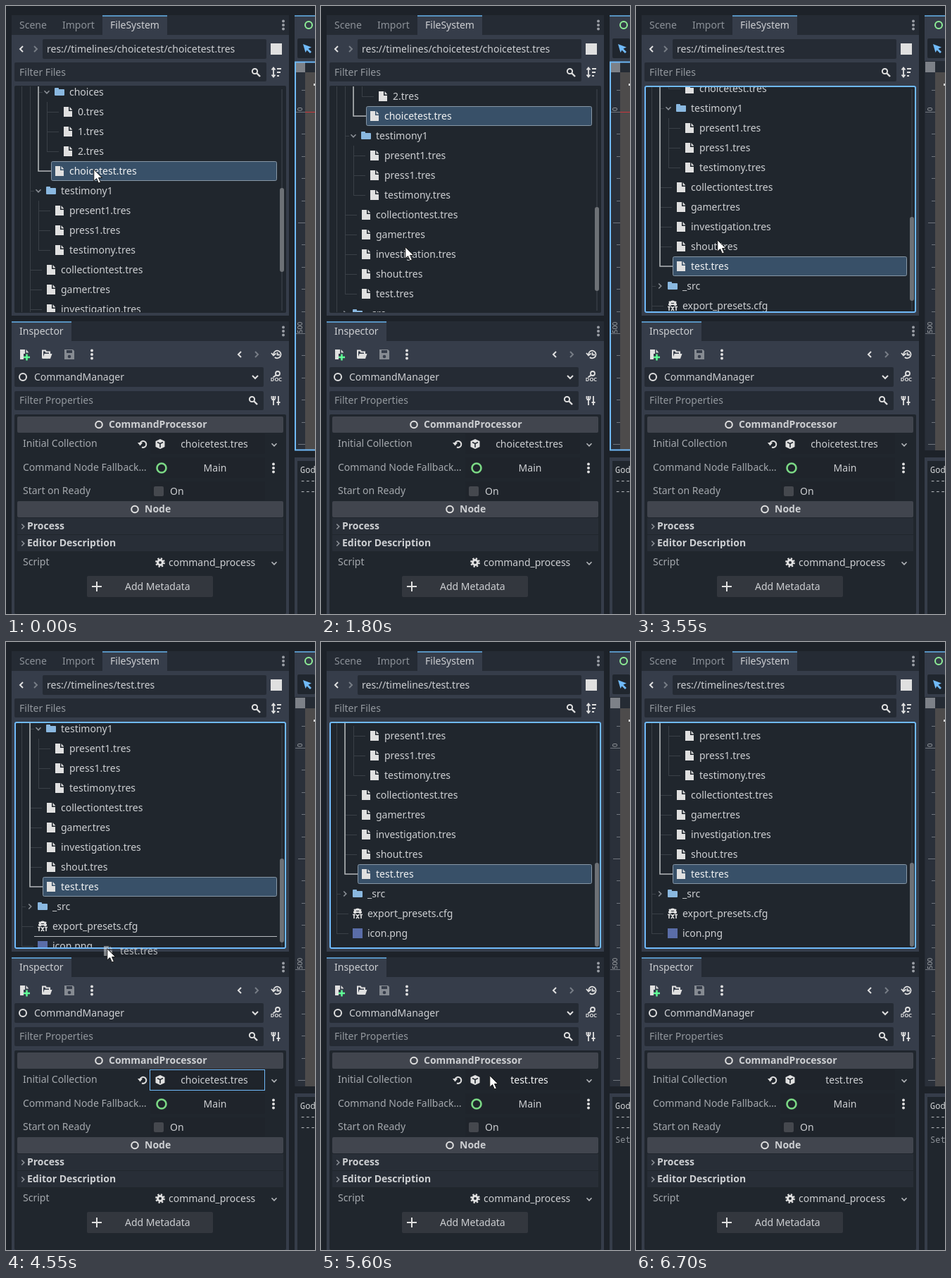
Recreate the animation shown at these times as an HTML page. Size 439 by 862 pixels, loop 7 s.

```html
<!DOCTYPE html>
<html lang="en">
<head>
<meta charset="utf-8">
<title>Editor docks</title>
<style>
  html, body { margin: 0; width: 100%; height: 100%; overflow: hidden; background: #1d2229; }
  svg { display: block; width: 439px; height: 862px; }
  text { font: 14px "Noto Sans", sans-serif; white-space: pre; }
  .b { font-weight: 700; }
  .m { font: 12px "Noto Sans Mono", monospace; }
  .s { font-size: 9.5px; }
</style>
</head>
<body>
<svg id="stage" viewBox="0 0 439 862"></svg>
<script>
const BASE = '#363d4a', DARK = '#1d2229', FIELD = '#252b34', LIST = '#20262d';
const TEXT = '#cdcfd2', DIM = '#8c9198', ICON = '#e0e0e0', BLUE = '#70bafa', LINE = '#5792c0';
const GREEN = '#8eef97', FOLDER = '#8ab8e0', GUIDE = '#3a4047', PATH = '#b0b3b6';

// Drawing helpers; text is placed by the middle of its line.
const rect = (x, y, w, h, fill, more = '') =>
  `<rect x="${x}" y="${y}" width="${w}" height="${h}" fill="${fill}" ${more}/>`;
const text = (x, y, str, fill = TEXT, more = '') =>
  `<text x="${x}" y="${y + 5}" fill="${fill}" ${more}>${str}</text>`;
const line = (d, stroke = ICON, w = 2, more = '') =>
  `<path d="${d}" fill="none" stroke="${stroke}" stroke-width="${w}" ${more}/>`;
const shape = (d, fill = ICON, more = '') => `<path d="${d}" fill="${fill}" ${more}/>`;
const ring = (x, y, r = 5, stroke = ICON, w = 2) =>
  `<circle cx="${x}" cy="${y}" r="${r}" fill="none" stroke="${stroke}" stroke-width="${w}"/>`;
const at = (x, y, body, more = '') => `<g transform="translate(${x} ${y})" ${more}>${body}</g>`;
const group = (id, body) => `<g id="${id}">${body}</g>`;
const mid = 'text-anchor="middle"';

const dots = (x, y, fill = ICON) =>
  [-5.5, 0, 5.5].map(d => `<circle cx="${x}" cy="${y + d}" r="2" fill="${fill}"/>`).join('');
const down = (x, y, s = 4, c = ICON, w = 2) =>
  line(`M${x - s} ${y - s / 2}l${s} ${s} ${s} ${-s}`, c, w);
const side = (x, y, dir, c = ICON, s = 4, w = 2) =>
  line(`M${x - dir * s / 2} ${y - s}l${dir * s} ${s} ${-dir * s} ${s}`, c, w);
const lens = (x, y) => ring(x - 1.5, y - 1.5, 3.6) + line(`M${x + 1} ${y + 1}l5 5`, ICON, 2.4);

const file = (x, y, more) =>
  at(x, y, shape('M-6 -7H1V-1H6V7H-6ZM2.5 -7L6 -3V-2.5H2.5Z'), more);
const folder = (x, y) => at(x, y, shape('M-7 -5q0 -1 1 -1h4q1 0 1 1v1h7q1 0 1 1v7q0 1 -1 1h-12q-1 0 -1 -1Z', FOLDER));
const gear = (x, y, r = 5.2) =>
  `<circle cx="${x}" cy="${y}" r="${r}" fill="none" stroke="${ICON}" stroke-width="3.4" stroke-dasharray="2.05 2.05"/>` +
  ring(x, y, 3.4, ICON, 3);
const cube = (x, y) => at(x, y,
  shape('M0 -7L6.5 -4V4L0 7L-6.5 4V-4Z') + line('M-4 -2.5L0 -.6L4 -2.5M0 0V4.8', LIST, 1.6));
const textFile = (x, y) => at(x, y,
  ring(0, -2, 4, ICON, 3) + line('M-6 -2H6M0 -7V-4M-5 -6l2 2M5 -6l-2 2', ICON, 2) +
  rect(-8, 0, 16, 8, LIST) + line('M-7 1.5h4M-5 1.5V7M-2 1l4 6M2 1l-4 6M3 1.5h4M5 1.5V7', ICON, 1.6));
const thumb = (x, y) => rect(x - 7, y - 7, 14, 14, '#5a6da8');

// Tree rows: name, depth, kind (f file, d open folder, c closed folder, x config, p picture).
const rows = [
  ['choices', 2, 'd'], ['0.tres', 3, 'f'], ['1.tres', 3, 'f'], ['2.tres', 3, 'f'],
  ['choicetest.tres', 2, 'f'], ['testimony1', 1, 'd'], ['present1.tres', 2, 'f'],
  ['press1.tres', 2, 'f'], ['testimony.tres', 2, 'f'], ['collectiontest.tres', 1, 'f'],
  ['gamer.tres', 1, 'f'], ['investigation.tres', 1, 'f'], ['shout.tres', 1, 'f'],
  ['test.tres', 1, 'f'], ['_src', 0, 'c'], ['export_presets.cfg', 0, 'x'], ['icon.png', 0, 'p']
];

function treeRow([name, depth, kind], i) {
  const y = 122 + 28 * i, x = 66 + 12 * depth, isDir = kind === 'd' || kind === 'c';
  let out = line(`M${x - 44} ${y + .5}h${isDir ? 6 : 17}`, GUIDE, 1);
  if (kind === 'd') out += down(x - 32, y, 3.5, DIM, 1.6);
  if (kind === 'c') out += side(x - 32, y, 1, DIM, 3.5, 1.6);
  const icon = { d: folder, c: folder, f: file, x: textFile, p: thumb }[kind];
  return out + icon(x - 14, y) + text(x, y, name);
}

function selection(id, x, y, name, depth) {
  const gx = 22 + 12 * depth;
  return group(id,
    line(`M${gx} 80V${y}H${x}`, PATH, 1.6) +
    rect(x + .5, y - 13.5, 384 - x, 27, '#385068', 'stroke="#8797a6" rx="2"') +
    file(x + 12, y) + text(x + 26, y, name, '#f0f1f2'));
}

const tree = () =>
  line('M22.5 60V570M34.5 60V486M46.5 60V234M46.5 276V346M58.5 136V206', GUIDE, 1) +
  rows.map(treeRow).join('') +
  selection('selOld', 64, 234, 'choicetest.tres', 2) +
  selection('selNew', 52, 486, 'test.tres', 1) +
  group('dropLine', rect(40, 556, 345, 1, '#b9bcc0'));

const fileDock = () =>
  rect(8, 13, 394, 28, FIELD) + rect(8, 41, 394, 398, BASE) +
  rect(137, 13, 92, 28, BASE) + rect(137, 13, 92, 2, LINE) +
  text(19, 27, 'Scene', DIM) + text(80, 27, 'Import', DIM) + text(148, 27, 'FileSystem') +
  dots(394, 27, '#9a9ea5') +
  side(22, 61, -1) + side(42, 61, 1, '#777d86') +
  rect(52, 47, 318, 28, FIELD, 'rx="2"') +
  `<text id="path" x="58" y="66" fill="${TEXT}"></text>` +
  rect(376, 53, 16, 16, ICON) +
  rect(12, 80, 358, 27, FIELD, 'rx="2"') + text(19, 94, 'Filter Files', '#93989e') + lens(355, 94) +
  line('M380 88V100M377.5 90.5L380 87.5L382.500 90.5M377.5 97.500L380 100.5L382.5 97.5M385 89h6M385 94h5M385 99h3', ICON, 1.8) +
  rect(12, 113, 386, 322, LIST, 'rx="2"') +
  `<clipPath id="view"><path d="M12 114H398V434H12Z"/></clipPath>` +
  `<g clip-path="url(#view)">${group('tree', tree())}</g>` +
  rect(391, 118, 2, 314, '#30363e') +
  rect(389, 258, 6, 119, '#6d7176', 'id="bar" rx="3"') +
  rect(13, 114, 384, 320, 'none', `id="listFocus" stroke="${BLUE}" stroke-width="2" rx="2"`);

const category = (y, x, name) =>
  rect(16, y, 378, 23, '#41454e', 'rx="2"') + ring(x, y + 11.5, 4.8) + text(x + 14, y + 11, name, TEXT, 'class="b"');
const section = (id, y, name) =>
  rect(16, y - 11, 378, 23, '#282e37', `id="${id}"`) +
  side(24, y + 1, 1, DIM, 3.5, 1.6) + text(30, y, name, TEXT, 'class="b"');
const label = (y, name) => text(24, y, name, '#a5a9ae');
const slot = (y, h = 29) => rect(205, y, 163, h, '#1f242b', 'rx="2"');

const inspector = () =>
  rect(8, 447, 394, 28, FIELD) + rect(8, 475, 394, 387, BASE) +
  rect(8, 447, 85, 28, BASE) + rect(8, 447, 85, 2, LINE) +
  text(19, 461, 'Inspector') + dots(394, 461, '#9a9ea5') +
  file(26, 494) + rect(25, 493, 10, 10, BASE) + line('M29.500 493.5v9M25 498h9', '#5fff97', 2.4) +
  at(58, 494, line('M-6 5.5V-5.5H-2L-1 -3.5H4V-1', ICON, 2) + shape('M-6 6L-3.500 -1H7.5L5 6Z')) +
  at(90, 494, shape('M-7 -7H5L7 -5V7H-7ZM-4 -6V-2H4V-6Z', '#868b92', 'fill-rule="evenodd"') +
    `<circle cy="3" r="2.300" fill="${BASE}"/>`) +
  dots(122, 494) + side(332, 494, -1) + side(356, 494, 1, '#777d86') +
  line('M380 494a5.3 5.3 0 1 1 1.800 4M377 492l3 3.500 3.500 -3M385.5 491v3.5h3.5', ICON, 1.8) +
  rect(12, 512, 354, 28, FIELD, 'rx="2"') + ring(24, 526, 5) + text(40, 526, 'CommandManager') + down(354, 526, 4) +
  ring(386, 521, 3, ICON, 1.8) + line('M383.500 523.500l-4 3', ICON, 2) +
  text(384, 527, 'DOC', ICON, `class="b" style="font-size:7.5px" ${mid}`) +
  rect(12, 546, 354, 27, FIELD, 'rx="2"') + text(19, 559, 'Filter Properties', '#93989e') + lens(351, 559) +
  line('M380 553V557M380 559V566M387 553V561M387 563V566', ICON, 1.8) +
  line('M377.500 558h5M384.5 562h5M377.5 553v4M382.5 553v4', ICON, 1.8) +
  rect(12, 579, 386, 283, LIST, 'rx="2"') +
  category(582, 132, 'CommandProcessor') +
  label(620, 'Initial Collection') +
  line('M190.500 620a4.5 4.5 0 1 1 2.500 5.500', ICON, 2) + shape('M187 619h7l-3.5 4.500Z') +
  slot(606) + cube(219, 621) +
  `<text id="value" x="296" y="626" ${mid}></text>` +
  rect(204.5, 606.5, 163, 29, 'none', `id="dropFocus" stroke="${BLUE}"`) +
  down(381, 622, 3.5, '#b4b7bb', 1.6) +
  label(654, 'Command Node Fallback…') + slot(640) + ring(221, 655, 6.5, '#7bd985', 2.6) +
  text(297, 655, 'Main', TEXT, mid) + dots(380, 655) +
  label(687, 'Start on Ready') + slot(674, 27) + rect(210, 681, 14, 14, '#45484e', 'rx="2"') + text(233, 688, 'On') +
  category(702, 183, 'Node') +
  section('process', 737, 'Process') + section('desc', 761, 'Editor Description') +
  label(788, 'Script') + gear(219, 789) + text(231, 789, 'command_process') + down(381, 790, 3.5, '#b4b7bb', 1.6) +
  rect(115, 808, 179, 30, '#33373e', 'rx="2"') + line('M122 823h14M129 816v14') + text(169, 823, 'Add Metadata');

function ruler() {
  let d = '';
  for (let k = -1; k <= 15; k++) {
    const y = 150 + 31.4 * k;
    d += `M${k % 10 === 0 ? 411 : k % 5 === 0 ? 415 : 420} ${Math.round(y) + .5}H425`;
  }
  const mark = (y, s) => `<text class="s" transform="translate(421 ${y}) rotate(-90)" fill="#a5a8ac">${s}</text>`;
  return rect(411, 79, 14, 551, '#2a303a') + line(d, '#70757d', 1) +
    rect(411, 79, 14, 15, '#7d8188') + mark(149, '0') + mark(464, '500');
}

const mono = (y, s, c = '#b9bcc0') => text(418, y - 1, s, c, 'class="m"');
const viewport = () =>
  rect(410, 13, 29, 617, BASE) + rect(410, 13, 29, 2, LINE) + ring(430, 27, 5, GREEN) +
  rect(414, 46, 25, 28, '#20262e', 'rx="2"') + shape('M422 54L434 58.500L429.500 60.5L434 65L432 67L427.500 62.500L425.500 66Z', '#70bafa') +
  rect(410, 78, 29, 552, '#252b34') + rect(425, 94, 14, 536, '#4d4b4b') + ruler() +
  rect(437, 110, 2, 3, '#d8d8d8') +
  group('viewFocus', rect(425, 150, 14, 1, '#c9353d') + line('M440 79.5H411V629.5H440', BLUE, 2)) +
  rect(410, 640, 29, 222, BASE) + rect(414, 645, 25, 217, LIST) +
  mono(658, 'Godo', '#d2d4d6') + mono(673, '----') + mono(688, '----') + group('log', mono(706, 'Set ', '#8f9399'));

const tooltip = (id, x, y, w, lines) => group(id,
  rect(x, y, w, 5 + 23 * lines.length, '#12151a', 'fill-opacity=".92" rx="2"') +
  lines.map((s, i) => text(x + 6, y + 14 + 23 * i, s)).join(''));

const pointer = () => group('pointer',
  group('drag', file(2, 4, 'opacity=".5"') + text(19, 4, 'test.tres', '#b5b8bb')) +
  shape('M.8 .8V17L4.600 13.500L7.500 20L10.300 18.800L7.500 12.500H12.500Z', '#fff', 'stroke="#1a1a1a"'));

document.getElementById('stage').innerHTML =
  rect(0, 0, 439, 862, DARK) + viewport() + fileDock() + inspector() +
  tooltip('tipFile', 134, 241, 112, ['choicetest.tres', 'Size: 462 B', 'Type: Resource']) +
  tooltip('tipValue', 249, 624, 185, ['res://timelines/test.tres', 'Type: CommandCollection']) + pointer();

const $ = id => document.getElementById(id);
const show = (id, on) => $(id).setAttribute('visibility', on ? 'visible' : 'hidden');
const ease = {
  lin: u => u, in: u => u * u, out: u => u * (2 - u), both: u => u * u * (3 - 2 * u)
};

// Pointer stops: time, x, y and the easing used to get there.
const stops = [
  [0, 124, 231], [550, 124, 231], [650, 124, 237, 'lin'],
  [1450, 124, 237], [2000, 117, 386, 'both'], [2150, 117, 386], [2300, 114, 402, 'out'],
  [2500, 114, 402], [2900, 116, 339, 'both'], [3000, 116, 339], [3100, 115, 331, 'lin'],
  [3700, 115, 331], [3900, 114, 364, 'both'], [4000, 114, 364], [4100, 112, 363, 'lin'],
  [4300, 112, 363], [4550, 143, 434, 'in'], [5050, 242, 614, 'out'], [5100, 239, 614, 'lin'],
  [6250, 239, 614], [6700, 250, 866, 'both'], [7000, 250, 866]
];

function pointerAt(t) {
  const i = stops.findIndex(s => s[0] > t);
  const [t0, x0, y0] = stops[i - 1], [t1, x1, y1, e = 'lin'] = stops[i];
  const u = ease[e]((t - t0) / (t1 - t0));
  return [Math.round(x0 + (x1 - x0) * u), Math.round(y0 + (y1 - y0) * u)];
}

function scrollAt(t) {
  const wheel = [1100, 1500, 3550].filter(s => t >= s).length * 39;
  return wheel + Math.min(40, Math.max(0, (t - 4450) / 50 * 11));
}

function draw(ms) {
  const t = Math.floor(ms / 50) * 50;
  const [x, y] = pointerAt(t), scroll = scrollAt(t);
  const picked = t >= 2450, dragging = t >= 4350 && t < 5600, dropped = t >= 5600;
  const hover = dropped && t < 6300;

  $('tree').setAttribute('transform', `translate(0 ${-scroll})`);
  $('bar').setAttribute('y', 258 + Math.round(scroll * .35));
  $('pointer').setAttribute('transform', `translate(${x} ${y})`);
  $('path').textContent = 'res://timelines/' + (picked ? 'test.tres' : 'choicetest/choicetest.tres');
  $('value').textContent = dropped ? 'test.tres' : 'choicetest.tres';
  $('value').setAttribute('fill', hover ? '#f2f3f4' : TEXT);
  $('process').setAttribute('fill', y >= 726 && y < 749 ? '#313740' : '#282e37');
  $('desc').setAttribute('fill', y >= 750 && y < 773 ? '#313740' : '#282e37');

  show('selOld', !picked);
  show('selNew', picked);
  show('listFocus', picked);
  show('viewFocus', !picked);
  show('drag', dragging);
  show('dropFocus', dragging);
  show('dropLine', dragging && t >= 4500);
  show('log', dropped);
  show('tipFile', t >= 200 && t < 1100);
  show('tipValue', t >= 6150 && t < 6300);
}

const start = performance.now();
function tick() {
  draw((performance.now() - start) % 7000);
  requestAnimationFrame(tick);
}
tick();
</script>
</body>
</html>
```
